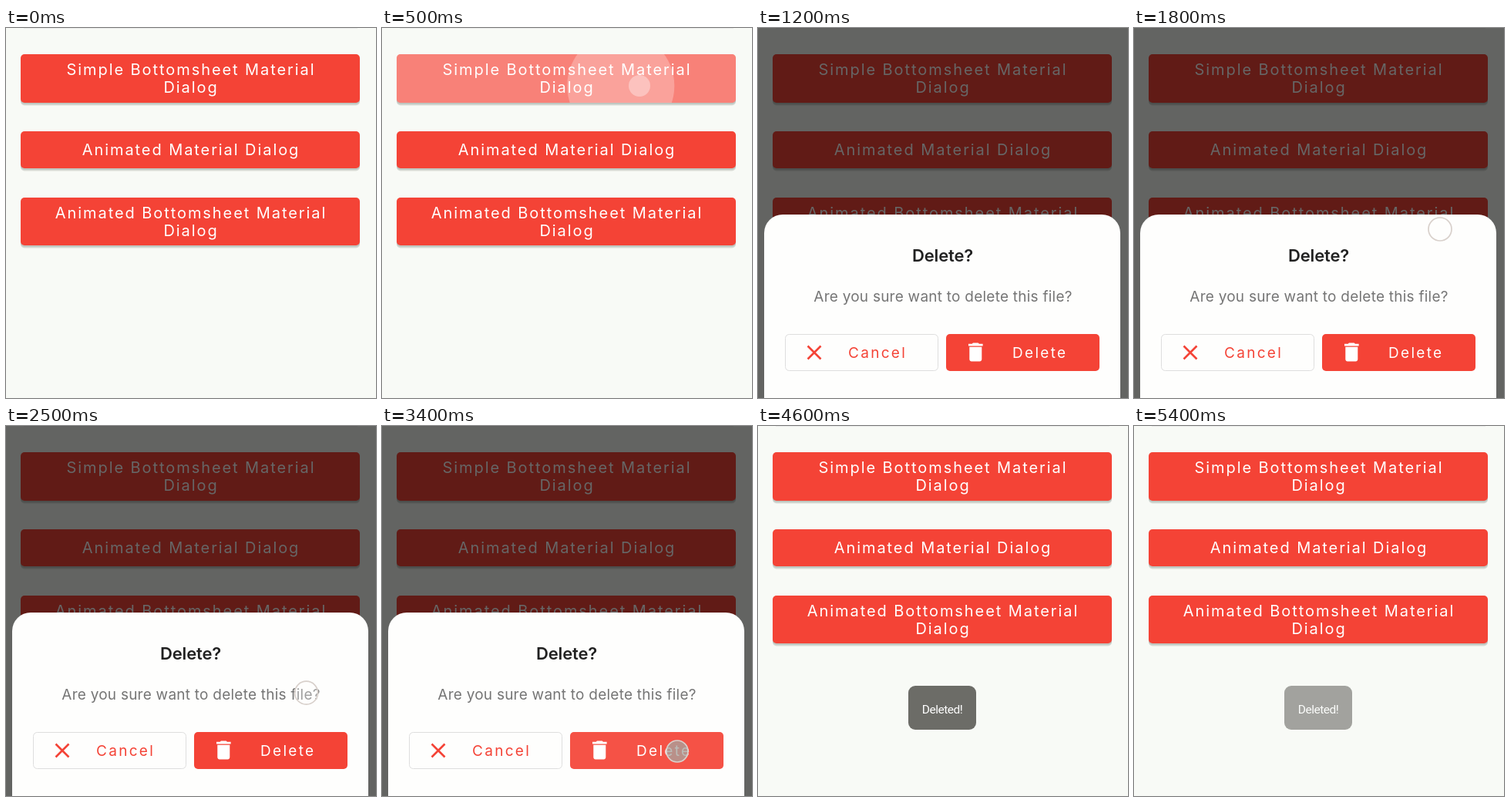
Write an HTML page that moves like this. It is 480 px wide and 480 px high and loops after 5.5 s.

```html
<!DOCTYPE html>
<html lang="en">
<head>
<meta charset="utf-8">
<title>Delete dialog</title>
<style>
html, body { margin: 0; width: 100%; height: 100%; overflow: hidden; background: #f8faf6; }
svg { display: block; width: 100vw; height: 100vh; }
text { font-family: Inter, "Open Sans", sans-serif; }
.label text { font-size: 20px; letter-spacing: 1.93px; fill: #fff; text-anchor: middle; }
.red { fill: #f44336; }
.shadow { fill: #8c9690; opacity: .3; }
.action { font-size: 19px; letter-spacing: 2.3px; }
</style>
</head>
<body>
<svg viewBox="0 0 480 480">
  <defs>
    <clipPath id="clip"><rect x="19" y="34" width="440" height="63" rx="5"/></clipPath>
  </defs>
  <rect width="480" height="480" fill="#f8faf6"/>
  <path d="M23 .5H456" stroke="#ebecea"/>
  <g id="buttons"></g>
  <g clip-path="url(#clip)" fill="#fff">
    <rect id="tint" x="19" y="34" width="440" height="63"/>
    <circle id="ripple" cy="75"/>
  </g>
  <g id="labels" class="label"></g>
  <rect id="scrim" width="480" height="480"/>
  <g id="sheet">
    <path d="M8 500V266a24 24 0 0 1 24-24H446a24 24 0 0 1 24 24V500Z" fill="#fefefd"/>
    <text x="239.5" y="303" text-anchor="middle" font-size="22" font-weight="600" letter-spacing="-.15" fill="#212121">Delete?</text>
    <text x="240" y="355" text-anchor="middle" font-size="19" letter-spacing=".24" fill="#757575">Are you sure want to delete this file?</text>
    <rect x="35.5" y="397.5" width="198" height="47" rx="5" fill="none" stroke="#dedede"/>
    <path d="M64.500 412.500l17 17m0-17l-17 17" stroke="#f44336" stroke-width="2.6"/>
    <text class="action red" x="117" y="428">Cancel</text>
    <rect class="red" x="244" y="397" width="199" height="48" rx="5"/>
    <rect id="press" x="244" y="397" width="199" height="48" rx="5" fill="#fff"/>
    <path transform="translate(266.300 404.500) scale(1.333)" fill="#fff"
      d="M6 19c0 1.100.9 2 2 2h8c1.100 0 2-.9 2-2V7H6zM19 4h-3.500l-1-1h-5l-1 1H5v2h14z"/>
    <text class="action" x="330" y="428" fill="#fff">Delete</text>
  </g>
  <circle id="pointer"/>
  <g id="toast">
    <rect x="195" y="336" width="88" height="57" rx="9" fill="#6c6c67"/>
    <text x="239" y="371.500" text-anchor="middle" style="font-family:Roboto,sans-serif" font-size="15.500" letter-spacing="-.5" fill="#fff">Deleted!</text>
  </g>
</svg>
<script>
const LOOP = 5500;
const $ = id => document.getElementById(id);
const set = (id, attrs) => {
  for (const key in attrs) $(id).setAttribute(key, attrs[key]);
};
const ramp = (t, from, to) => Math.min(1, Math.max(0, (t - from) / (to - from)));
const smooth = p => p * p * (3 - 2 * p);
const mix = (a, b, p) => a + (b - a) * p;

const buttons = [
  [34, 63, ["Simple Bottomsheet Material", "Dialog"]],
  [134, 48, ["Animated Material Dialog"]],
  [220, 62, ["Animated Bottomsheet Material", "Dialog"]]
];
for (const [y, h, lines] of buttons) {
  const box = (cls, dy) =>
    `<rect class="${cls}" x="19" y="${y + dy}" width="440" height="${h}" rx="5"/>`;
  $("buttons").innerHTML += box("shadow", 3.5) + box("shadow", 2) + box("red", 0);
  const top = y + h / 2 + 7 - (lines.length - 1) * 11.5;
  $("labels").innerHTML += lines.map((line, i) =>
    `<text x="240" y="${top + i * 23}">${line}</text>`).join("");
}

function pointer(t) {
  if (t >= 400 && t < 600)
    return { cx: 334, cy: 75, r: 14, fill: "#fff", "fill-opacity": .35, stroke: "none", opacity: 1 };
  const pressed = t >= 3200;
  const p = smooth(ramp(t, 1800, 3150));
  return {
    cx: mix(397, 383, p), cy: mix(261, 422, p), r: pressed ? 14 : 15,
    fill: pressed ? "#a4a6a0" : "#fff", "fill-opacity": pressed ? .75 : .3,
    stroke: "#d8d0cb", "stroke-width": 1.7,
    opacity: t < 3500 ? ramp(t, 1600, 1750) : 0
  };
}

function draw(t) {
  const held = ramp(t, 380, 450) * (1 - ramp(t, 580, 780));
  const spread = ramp(t, 400, 800);
  set("tint", { opacity: .33 * held });
  set("ripple", { cx: mix(334, 238, spread), r: mix(10, 246, spread), opacity: .26 * held });

  const rise = 238 * (1 - ramp(t, 540, 790)) ** 3;
  const fall = 245 * ramp(t, 3420, 3590) ** 2;
  set("sheet", {
    transform: `translate(0 ${rise + fall})`,
    opacity: t >= 540 && t < 3590 ? 1 : 0
  });
  set("scrim", { opacity: .6 * ramp(t, 530, 690) * (1 - ramp(t, 3420, 3590)) });
  set("press", { opacity: .08 * ramp(t, 3200, 3350) });
  set("pointer", pointer(t));
  set("toast", {
    transform: `translate(0 ${ramp(t, 3600, 3700)})`,
    opacity: ramp(t, 3490, 3605) * (1 - ramp(t, 5300, 5560))
  });
}

const start = performance.now();
function tick() {
  draw((performance.now() - start) % LOOP);
  requestAnimationFrame(tick);
}
tick();
</script>
</body>
</html>
```
